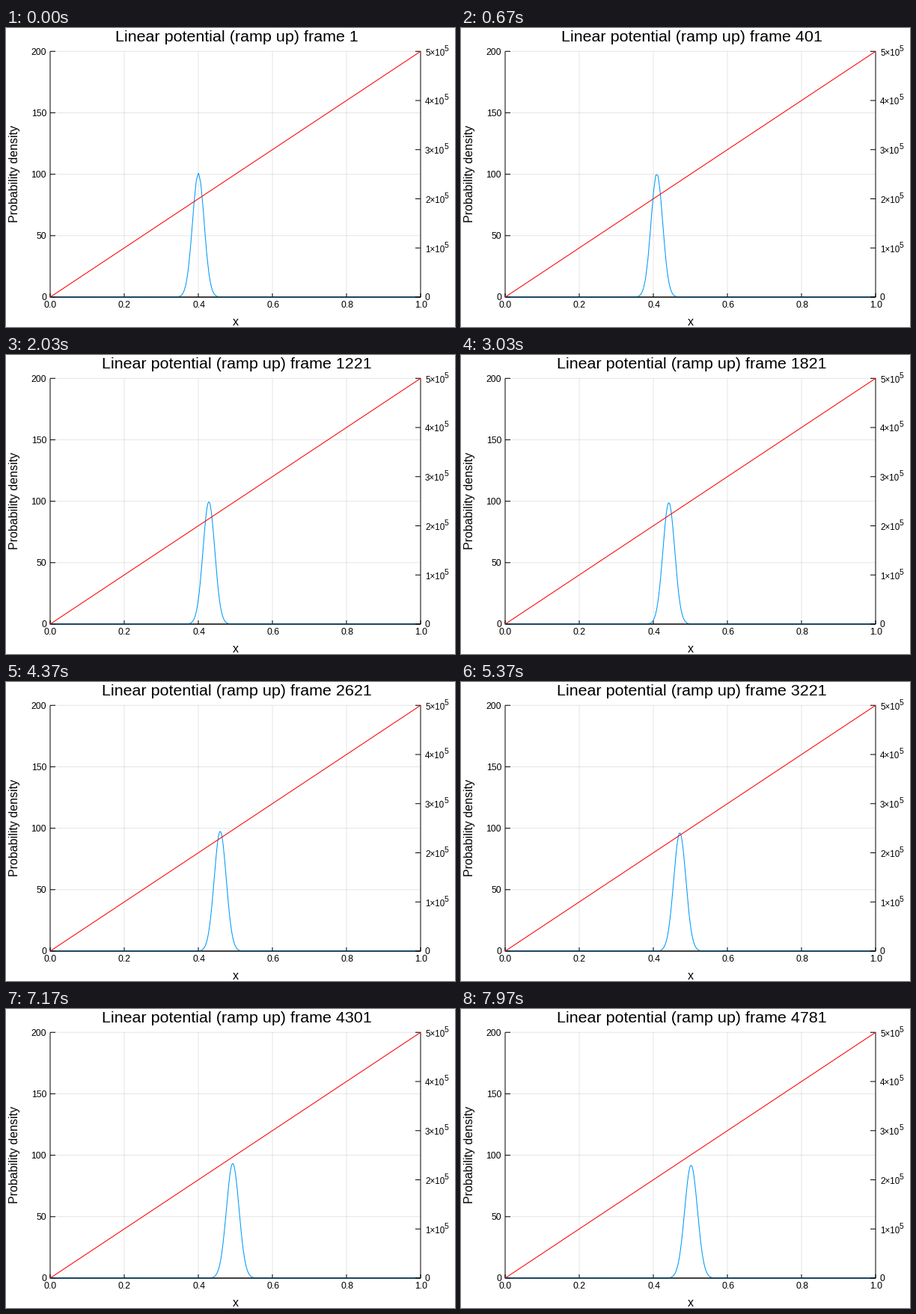
These frames come from a looping animation (600x400 px, 8 s). A matplotlib script:

```python
import numpy as np
import matplotlib.pyplot as plt
from matplotlib.animation import FuncAnimation

POSES, TICK_MS, LOOP_MS = 240, 10, 8000
LEFT, RIGHT, TOP, BOTTOM = 59, 554, 31.25, 360
PT = 0.72  # points per pixel at 100 dpi
N, DX, DT, SLOPE = 1000, 1e-3, 5e-8, 5e5


def wave_packet():
    """Leapfrog the Schroedinger equation on a ramp; one density per pose."""
    x = np.linspace(0, 1, N)
    shape = 10 * np.exp(-(x - 0.4) ** 2 / 1e-3)
    re, im = shape * np.cos(500 * x), shape * np.sin(500 * x)
    v = SLOPE * x

    def step(f):
        lap = np.zeros(N)
        lap[1:-1] = f[2:] - 2 * f[1:-1] + f[:-2]
        return DT * (v * f - lap / (2 * DX ** 2))

    im = im - step(re)
    poses = []
    for n in range(20 * (POSES - 1) + 1):
        re = re + step(im)
        last, im = im, im - step(re)
        if n % 20 == 0:
            poses.append(re ** 2 + im * last)
    return x, poses


def px(x):
    return LEFT + (RIGHT - LEFT) * x


def py(p):
    return BOTTOM - (BOTTOM - TOP) * p / 200


plt.rcParams["font.family"] = "Liberation Sans"
fig = plt.figure(figsize=(6, 4), dpi=100, facecolor="white")
ax = fig.add_axes([0, 0, 1, 1])
ax.set(xlim=(0, 600), ylim=(400, 0))
ax.axis("off")


def vlines(x, y0, y1, **kw):
    ax.vlines(x, y0, y1, "black", lw=PT, snap=False, **kw)


def hlines(y, x0, x1, **kw):
    ax.hlines(y, x0, x1, "black", lw=PT, snap=False, **kw)


def curve(xs, ys, color):
    return ax.plot(xs, ys, color=color, lw=1.05 * PT, snap=False)[0]


def label(x, y, text, size, ha="center", va="baseline", **kw):
    return ax.text(x, y, text, fontsize=size * PT, ha=ha, va=va, **kw)


x_ticks = px(np.linspace(0, 1, 6))
y_ticks = py(np.linspace(0, 200, 5))
v_ticks = py(np.linspace(0, 200, 6))

vlines(x_ticks[1:-1], TOP, BOTTOM, alpha=0.1)
hlines(y_ticks[1:], LEFT, RIGHT, alpha=0.1)
vlines(LEFT, TOP, BOTTOM)
hlines(BOTTOM, LEFT, RIGHT)
vlines(x_ticks, BOTTOM - 5, BOTTOM)
hlines(y_ticks, LEFT, LEFT + 7)

x_grid, densities = wave_packet()
density = curve(px(x_grid), py(densities[0]), "#009afa")

hlines(BOTTOM, LEFT, RIGHT)
vlines(RIGHT, TOP, BOTTOM)
hlines(v_ticks, RIGHT - 7, RIGHT)
curve([LEFT, RIGHT], [BOTTOM, TOP], "red")

for i, x in enumerate(x_ticks):
    label(x + 0.5, 374, f"{i / 5:.1f}", 12.1)
for i, y in enumerate(y_ticks):
    label(54, y + 4.4, str(50 * i), 12.1, "right")
label(560, v_ticks[0] + 4.4, "0", 12.1, "left")
for i, y in enumerate(v_ticks[1:], 1):
    label(560, y + 5.4, f"{i}×10", 11.6, "left")
    label(586, y - 0.5, "5", 10.2, "left")

label(307, 398, "x", 16)
label(12, 194.5, "Probability density", 16, va="center", rotation=90,
      rotation_mode="default")
title = label(308.3, 18, "", 21.5)


def draw(tick):
    k = (6 * tick + 3) // 20  # 30 poses a second, on a 10 ms clock
    density.set_ydata(py(densities[k]))
    title.set_text(f"Linear potential (ramp up) frame {1 + 20 * k}")
    return density, title


anim = FuncAnimation(fig, draw, frames=LOOP_MS // TICK_MS, interval=TICK_MS,
                     init_func=lambda: draw(0), repeat=True, repeat_delay=0)
plt.show()
```
